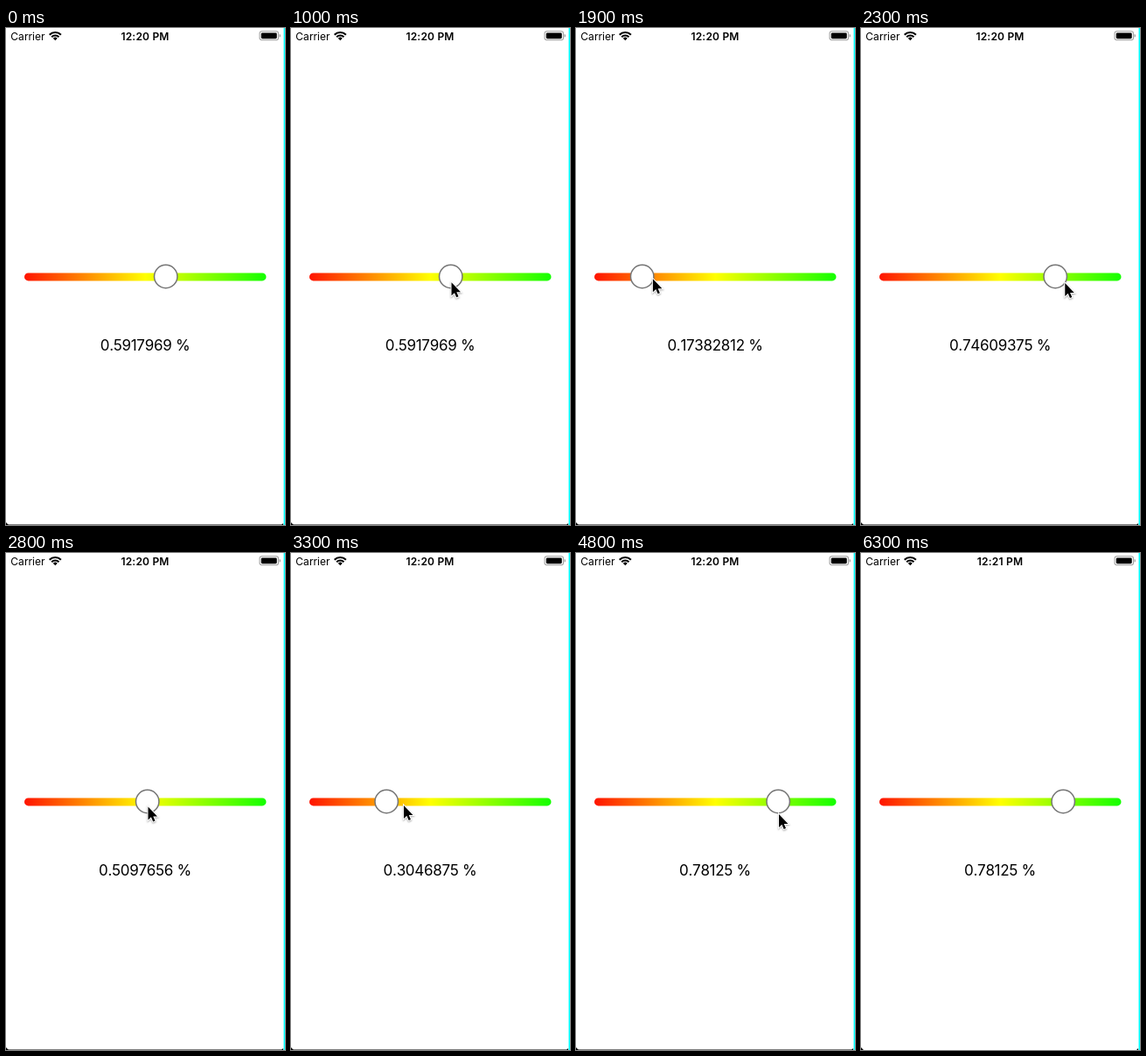
Write an HTML page with a canvas that moves like this. It is 319 by 567 pixels and loops after 6.4 s.

```html
<!DOCTYPE html>
<html lang="en">
<head>
<meta charset="utf-8">
<title>Gradient slider</title>
<style>
  html, body { margin: 0; width: 100%; height: 100%; overflow: hidden; background: #fff; }
  canvas { display: block; }
</style>
</head>
<body>
<canvas id="stage" width="319" height="567"></canvas>
<script>
const W = 319, H = 567, LOOP = 6400, STEP = 100;
const ctx = document.getElementById('stage').getContext('2d');
const BAR = { x: 21, y: 279.4, w: 276.5, h: 9 };
const POINTER_IN = 500, POINTER_OUT = 5200, LEAD = 45;

// Turning points of the drag: time, thumb x
const DRAG = [
  [1100, 182.5], [1300, 237], [1543, 61], [1800, 65], [2430, 240],
  [3170, 83], [3674, 250], [3900, 252], [4165, 51], [4700, 236], [4800, 231]
];
// The hand enters from below, wanders and drops away: time, pointer y
const HAND = [
  [500, 379], [1100, 284], [1500, 281.5], [2300, 291], [3300, 288],
  [4100, 295], [4800, 298], [4900, 298], [5100, 359]
];

// Value at time t, swinging smoothly from point to point.
function follow(points, t) {
  const next = points.findIndex(p => p[0] > t);
  if (next === 0) return points[0][1];
  if (next < 0) return points[points.length - 1][1];
  const [t0, v0] = points[next - 1], [t1, v1] = points[next];
  const p = (t - t0) / (t1 - t0);
  return v0 + (v1 - v0) * (1 - Math.cos(Math.PI * p)) / 2;
}

// The pointer runs ahead of the thumb on the way right.
function pointerAt(t) {
  const y = follow(HAND, t);
  const x = Math.max(follow(DRAG, t), follow(DRAG, t + LEAD));
  return [x + 1 + Math.max(0, y - 298) * 0.06, y];
}

// Shortest decimal that survives a 32-bit float round trip, ties to even.
function floatText(n) {
  const v = n / 512;
  const nudged = n % 4 === 1 ? v - 1e-11 : v;
  for (let digits = 1; digits < 9; digits++) {
    const s = nudged.toPrecision(digits);
    if (Math.fround(+s) === v) return s;
  }
  return String(v);
}

function label(str, x, y, font, align, spacing) {
  ctx.font = font + ' Inter, sans-serif';
  ctx.fontKerning = 'none';
  ctx.textAlign = align;
  ctx.letterSpacing = spacing + 'px';
  ctx.fillStyle = '#000';
  ctx.fillText(str, x, y);
}

function box(x, y, w, h, r, fill) {
  ctx.beginPath();
  ctx.roundRect(x, y, w, h, r);
  ctx.fillStyle = fill;
  ctx.fill();
}

function drawWifi(x, y) {
  const from = -Math.PI * 0.75, to = -Math.PI * 0.25;
  ctx.fillStyle = '#000';
  for (const [outer, inner] of [[10.4, 8.2], [6.9, 4.8], [3.5, 0]]) {
    ctx.beginPath();
    ctx.arc(x, y, outer, from, to);
    ctx.arc(x, y, inner, to, from, true);
    ctx.fill();
  }
}

function drawBattery() {
  box(289.5, 3.3, 22.5, 11, 3, '#a0a0a0');
  box(290.5, 4.3, 20.5, 9, 2.2, '#fff');
  box(291.7, 5.4, 18, 6.8, 1.4, '#000');
  box(312.5, 7, 1.3, 3.6, [0, 1.3, 1.3, 0], '#a0a0a0');
}

function drawBar() {
  const g = ctx.createLinearGradient(BAR.x, 0, BAR.x + BAR.w, 0);
  g.addColorStop(0, '#ff1400');
  g.addColorStop(0.5, '#ffff00');
  g.addColorStop(1, '#14ff00');
  box(BAR.x, BAR.y, BAR.w, BAR.h, BAR.h / 2, g);
}

function drawThumb(x) {
  ctx.beginPath();
  ctx.arc(x + 0.2, 283.5, 13.2, 0, Math.PI * 2);
  ctx.fillStyle = '#fff';
  ctx.fill();
  ctx.strokeStyle = '#757575';
  ctx.lineWidth = 1.5;
  ctx.stroke();
}

function drawPointer(x, y) {
  ctx.save();
  ctx.translate(x, y);
  const arrow = new Path2D('M0 0V15L3.4 11.8 5.7 17 8 16 5.8 10.9H10.5Z');
  ctx.shadowColor = 'rgba(0,0,0,.35)';
  ctx.shadowBlur = 2;
  ctx.shadowOffsetY = 1;
  ctx.strokeStyle = '#fff';
  ctx.lineWidth = 2;
  ctx.stroke(arrow);
  ctx.shadowColor = 'transparent';
  ctx.fillStyle = '#000';
  ctx.fill(arrow);
  ctx.restore();
}

function drawEdges(t) {
  ctx.fillStyle = '#00ffff';
  ctx.fillRect(317.5, 0, 1.5, H);
  ctx.fillStyle = '#808080';
  if (t < 6300) ctx.fillRect(2, H - 1, 314, 1);
  ctx.fillStyle = '#000';
  ctx.beginPath();
  ctx.moveTo(0, H - 3);
  ctx.lineTo(3, H);
  ctx.lineTo(0, H);
  ctx.moveTo(317, H - 2);
  ctx.lineTo(317, H);
  ctx.lineTo(315, H);
  ctx.fill();
}

function draw(t) {
  const n = Math.round((follow(DRAG, t) - 31) * 2);
  ctx.fillStyle = '#fff';
  ctx.fillRect(0, 0, W, H);
  drawEdges(t);
  label('Carrier', 5.3, 13.5, '12px', 'left', 0.05);
  drawWifi(56.3, 14.3);
  label(t < 5800 ? '12:20 PM' : '12:21 PM', 159, 13.5, '600 12px', 'center', 0.2);
  drawBattery();
  drawBar();
  drawThumb(31 + n / 2);
  label(floatText(n) + ' %', 159, 368, '17px', 'center', -0.3);
  if (t >= POINTER_IN && t < POINTER_OUT) drawPointer(...pointerAt(t));
}

const start = performance.now();
function tick() {
  const t = (performance.now() - start) % LOOP;
  draw(Math.floor(t / STEP) * STEP);
  requestAnimationFrame(tick);
}
tick();
</script>
</body>
</html>
```
